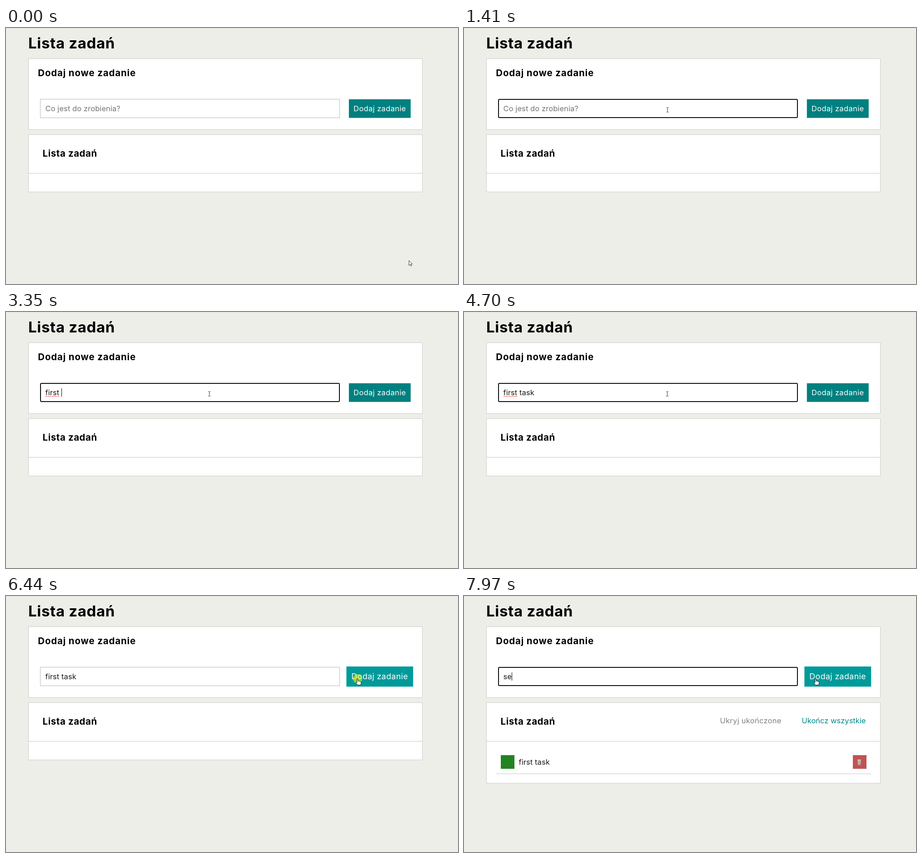
Recreate the animation shown at these times as an HTML page. Size 995x563 px, loop 8000 ms.

```html
<!DOCTYPE html>
<html lang="pl">
<head>
<meta charset="utf-8">
<title>Lista zadań</title>
<style>
  html, body { margin: 0; width: 100%; height: 100%; overflow: hidden; background: #edeee8; }
  svg { display: block; }
  text { font: 16.5px Inter, sans-serif; white-space: pre; }
  .h1 { font-size: 33px; font-weight: 700; letter-spacing: .65px; }
  .h2 { font-size: 20.4px; font-weight: 700; letter-spacing: .6px; }
  .wide { letter-spacing: .88px; }
  .panel { fill: #fff; stroke: #ccc; }
  .line { fill: none; stroke: #c4c4c4; }
  .wave { stroke: #e22; stroke-width: 1.3; stroke-dasharray: 1.6 1; }
</style>
</head>
<body>
<svg width="995" height="563" viewBox="0 0 995 563">
  <rect width="995" height="563" fill="#edeee8"/>
  <rect width="995" height="1" fill="#e0e1dc"/>
  <text class="h1" x="49" y="45">Lista zadań</text>

  <rect class="panel" x="49.5" y="67.5" width="867" height="156"/>
  <text class="h2 wide" x="70.3" y="106">Dodaj nowe zadanie</text>
  <rect id="field"/>
  <text id="entry" x="86.5" y="183" letter-spacing=".08"></text>
  <path id="wave1" class="wave" d="M87 185.7H117"/>
  <path id="wave2" class="wave" d="M121.5 185.7H155"/>
  <rect id="caret" y="168" width="1" height="18"/>
  <g id="button">
    <rect id="face" x="754.8" y="156.7" width="136" height="41"/>
    <text x="765" y="183" fill="#fff" letter-spacing=".35">Dodaj zadanie</text>
  </g>

  <rect id="list" class="panel" x="49.5" y="234.5" width="867"/>
  <path class="line" d="M50 319.5H916"/>
  <text class="h2" x="80.6" y="283">Lista zadań</text>
  <g id="row">
    <text x="563.5" y="280" fill="#808080" letter-spacing=".27">Ukryj ukończone</text>
    <text x="743.5" y="280" fill="#008a8a">Ukończ wszystkie</text>
    <rect x="81" y="350" width="30" height="30" fill="#228322"/>
    <text x="120.5" y="371" fill="#1c1c1c" letter-spacing=".08">first task</text>
    <rect x="856" y="350" width="30" height="30" fill="#c15353"/>
    <path d="M866.5 361.5l.8 9.5q2.7 1.2 5.4 0l.8-9.5z" fill="#d8c8c4" stroke="#a98d88" stroke-width=".6"/>
    <path d="M868.6 362.5l.4 8M870 362.5v8.3M871.4 362.5l-.4 8" stroke="#937c78" stroke-width=".6"/>
    <ellipse cx="870" cy="360.8" rx="4.2" ry="1.5" fill="#e3d6d2" stroke="#94807c" stroke-width=".6"/>
    <path class="line" d="M71 391H896"/>
  </g>

  <circle id="ring" r="10.3" fill="#ff0" fill-opacity=".52"/>
  <g id="arrow" stroke="#222" fill="#fff">
    <path d="M0 .3V11.2L2.5 8.9L4.2 12.4L6 11.6L4.4 8.2H7.5Z" stroke-width=".9"/>
  </g>
  <g id="beam" stroke="#333" fill="none">
    <path d="M-2.5 -5H-.7L0 -4.4L.7 -5H2.5M0 -4.4V4.4M-2.5 5H-.7L0 4.4L.7 5H2.5"/>
  </g>
  <g id="hand" stroke="#111" fill="#fff" stroke-width=".9" stroke-linejoin="round">
    <path d="M-1.2 .8Q0 -.6 1.2 .8V5.2Q2.6 4.4 3.6 5.6Q5 5 5.7 6.2Q7.4 5.8 7.6 7.4V10.5L6.3 13.8H-.2L-3.7 9.2Q-3.8 7.6 -2.3 8L-1.2 9Z"/>
  </g>
</svg>
<script>
const LOOP = 8000;
const el = id => document.getElementById(id);
const set = (id, attrs) => { for (const k in attrs) el(id).setAttribute(k, attrs[k]); };
const show = (id, on) => set(id, { visibility: on ? 'visible' : 'hidden' });
const within = (t, a, b) => t >= a && t < b;
const ramp = (t, a, b) => Math.min(1, Math.max(0, (t - a) / (b - a)));
const ease = u => u * u * (3 - 2 * u);

const HINT = 'Co jest do zrobienia?';
const KEYS_1 = [2290, 2520, 2640, 2820, 3050, 3280, 3650, 3700, 3890, 4120];
const KEYS_2 = [7780, 7970];
const CARET = [[880, 1410], [1940, 4700], [5180, 5710], [6240, 6400], [6520, 7020], [7550, 8000]];
// time, x, y of the pointer's hot spot
const PATH = [[60, 887, 511], [830, 448, 180], [4950, 447.5, 180], [5640, 768.5, 179.5],
  [5720, 768.5, 179.5], [6020, 774, 182], [8000, 774, 182]];

function pointer(t) {
  let i = 1;
  while (i < PATH.length - 1 && t > PATH[i][0]) i++;
  const [a, b] = [PATH[i - 1], PATH[i]];
  const u = ease(ramp(t, a[0], b[0]));
  return [a[1] + (b[1] - a[1]) * u, a[2] + (b[2] - a[2]) * u];
}

function typed(t) {
  const [word, keys] = t < 6520 ? ['first task', KEYS_1] : ['se', KEYS_2];
  return word.slice(0, keys.filter(k => k <= t).length);
}

function draw(t) {
  const value = typed(t), entry = el('entry');
  entry.textContent = value || HINT;
  set('entry', { fill: value ? '#1c1c1c' : '#757575' });
  const width = value ? entry.getComputedTextLength() : 0;
  set('caret', { x: Math.round(86.7 + width) });
  show('caret', CARET.some(([a, b]) => within(t, a, b)));
  show('wave1', within(t, 3350, 6400));
  show('wave2', within(t, 5400, 6400));

  const focus = within(t, 880, 6400) || t >= 6520;
  set('field', focus
    ? { x: 76, y: 157, width: 658, height: 40, rx: 2, fill: '#fff', stroke: '#101010', 'stroke-width': 2 }
    : { x: 75.5, y: 156.5, width: 659, height: 41, rx: 0, fill: '#fff', stroke: '#b8b8b8', 'stroke-width': 1 });

  const scale = 1 + .08 * ease(ramp(t, 5480, 5640));
  set('button', { transform: `translate(822.75 177.2) scale(${scale}) translate(-822.75 -177.2)` });
  const tone = 128 + 26 * ramp(t, 5680, 5920);
  set('face', { fill: `rgb(0 ${tone} ${tone})` });

  const done = t >= 6520;
  set('list', { height: done ? 177 : 126 });
  show('row', done);

  const [x, y] = pointer(t);
  const inRow = y > 156 && y < 198;
  const kind = inRow && x < 735 ? 'beam' : inRow && x > 752 ? 'hand' : 'arrow';
  for (const id of ['arrow', 'beam', 'hand']) {
    show(id, id === kind);
    set(id, { transform: `translate(${x} ${y})` });
  }
  show('ring', within(t, 800, 950) || within(t, 6400, 6520));
  set('ring', { cx: x, cy: y });
}

function tick() {
  draw(performance.now() % LOOP);
  requestAnimationFrame(tick);
}
tick();
</script>
</body>
</html>
```
